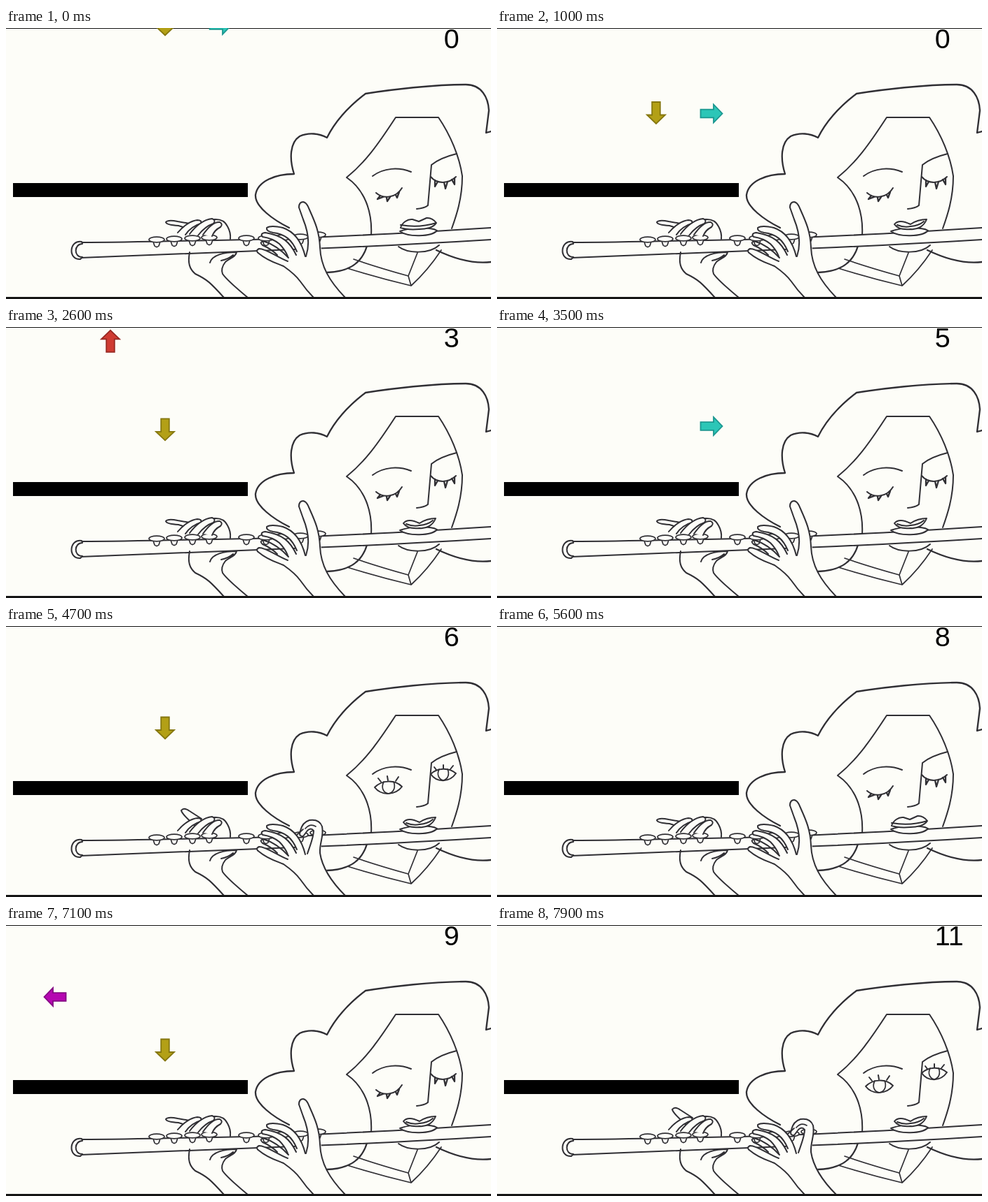
These frames come from a looping animation (692 by 388 pixels, 8 s). An HTML page:

```html
<!DOCTYPE html>
<html lang="en">
<head>
<meta charset="utf-8">
<title>Flute rhythm game</title>
<style>
  html, body { margin: 0; width: 100%; height: 100%; overflow: hidden; background: #fdfdf8; }
  svg { display: block; width: 100vw; height: 100vh; }
  .ink { fill: none; stroke: #302f34; stroke-width: 2; stroke-linecap: round; stroke-linejoin: round; }
  .skin { fill: #fdfdf8; }
  .hair { stroke-width: 2.3; }
  .lash { stroke-width: 2.3; }
  .fine { stroke-width: 1.7; }
  text { font: 39.5px "Liberation Sans", Arial, sans-serif; fill: #000; }
</style>
</head>
<body>
<svg viewBox="0 0 692 388" preserveAspectRatio="none">
  <rect width="692" height="388" fill="#fdfdf8"/>

  <g class="ink">
    <g class="hair">
      <path d="M404 286C382 275 355 256 356 239C359 219 385 209 411 209C404 187 405 164 419 155C432 149 447 151 458 157C469 135 488 113 513 94C550 88 610 81 656 81C679 81 688 100 689 118L685 150L692 148"/>
      <path d="M458 350C485 349 507 340 515 312M614 318C643 332 668 338 692 335"/>
    </g>
    <path d="M486 214C512 193 530 168 556 128H617C634 153 647 184 651 212C651 245 642 270 636 287M486 214C511 231 523 262 521 297"/>
    <path d="M643 180Q619 186 607 196L602 254Q597 258 586 259"/>
    <path d="M523 212C539 200 560 199 578 206"/>
    <path d="M560 313C573 323 604 324 618 311"/>
    <path class="fine" d="M496 331Q531 343 574 355L587 322M487 344Q532 358 578 369Q602 347 621 318M574 355L578 369"/>
  </g>

  <g class="ink">
    <path class="skin" d="M106 307C190 307 270 304 350 303Q490 299 692 286V303Q560 311 460 315Q300 321 106 329Z" stroke="none"/>
    <path d="M106 307C190 307 270 304 350 303Q490 299 692 286M106 329Q300 321 460 315Q560 311 692 303"/>
    <path class="skin" d="M108 306C90 303 88 332 106 331L109 328C96 328 97 309 109 309Z"/>
    <g id="keys" class="fine"></g>
  </g>

  <g class="ink" id="eyesShut">
    <path d="M528 236C538 245 556 244 565 229M606 213C615 224 632 223 642 213"/>
    <path class="lash" d="M534 240L530 245L538 242M543 243L544 248L548 242M556 239L558 243L561 235M612 218L612 227L616 220M625 221L627 230L630 220M636 217L640 224L640 215"/>
  </g>

  <g class="ink" id="eyesOpen">
    <path d="M526 231C537 220 555 220 565 230C556 242 536 244 526 231ZM606 212C615 203 632 202 642 211C633 224 615 225 606 212Z"/>
    <path class="fine" d="M539 223C535 231 538 239 546 240C554 238 556 230 553 223M618 205C614 213 618 220 624 221C631 219 633 212 630 205"/>
    <path d="M535 223L531 218M545 221L544 215M556 222L560 216M614 206L611 202M624 204L624 199M634 205L638 200"/>
  </g>

  <g class="ink">
    <path class="skin" d="M562 291C578 285 606 285 615 290C607 299 574 300 562 291Z"/>
    <path id="lipsWide" class="skin" d="M563 286C565 279 573 273 580 274L589 277L600 272Q608 271 614 279C610 286 598 288 590 288C578 289 569 288 563 286ZM563 282C580 285 598 284 614 279"/>
    <path id="lipsHeart" class="skin" d="M567 281C571 276 578 275 590 281C596 277 604 274 613 274C609 284 600 289 590 288C579 289 571 287 567 281ZM571 282Q581 286 590 284Q602 283 609 277"/>
  </g>

  <g class="ink">
    <path d="M262 321C259 337 262 345 270 352C287 360 292 365 311 386M291 336C294 325 311 321 329 321C328 328 318 330 313 335Q306 344 309 352Q315 361 345 386M307 333Q317 331 324 325"/>
    <path d="M297 274Q311 273 316 284Q321 293 320 302"/>
  </g>

  <g class="ink" id="handsUp">
    <path class="skin" d="M256 286L246 283Q229 282 228 278Q231 274 245 277L262 280"/>
  </g>
  <g class="ink" id="handsDown">
    <path class="skin" d="M269 286C263 279 251 270 250 264Q254 259 262 265L279 276"/>
  </g>
  <g class="ink">
    <path class="skin" d="M245 293C253 283 264 276 273 275Q280 275 278 280C270 282 261 288 256 296"/>
    <path class="skin" d="M262 295C270 284 282 274 294 273Q300 275 296 280C287 283 280 289 274 297"/>
    <path class="skin" d="M281 296C288 286 297 277 305 278Q310 281 306 285C300 288 296 293 294 298"/>
  </g>

  <g class="ink">
    <path class="skin" stroke="none" d="M402 328L412 318L432 310L449 312L456 348L484 386H438L400 345Z"/>
    <path class="skin" d="M427 327C422 307 413 292 395 286Q378 282 372 286Q371 291 381 293C398 295 408 303 415 320"/>
    <path class="skin" d="M414 325C405 306 394 297 370 293Q362 294 366 299Q380 301 390 309Q398 317 402 327"/>
    <path d="M403 329C393 318 380 309 367 305Q361 307 366 311Q378 316 387 325"/>
    <path class="skin" d="M402 334C388 329 372 316 361 316Q355 319 361 323C374 334 387 337 396 341Q413 353 420 363Q429 376 439 386"/>
  </g>

  <g class="ink" id="indexUp">
    <path class="skin" d="M428 327C434 309 431 291 424 274L418 257Q418 249 424 249Q429 250 432 258C440 276 447 290 448 314C449 341 461 362 484 386"/>
  </g>
  <g class="ink" id="indexDown">
    <path class="skin" d="M430 326C435 311 439 302 439 293Q435 288 430 293L424 301Q417 302 420 293Q423 281 433 278Q447 276 451 287C454 301 447 310 448 325C451 345 462 364 484 386"/>
    <path class="fine" d="M427 290Q434 282 442 287M415 299L424 291"/>
  </g>

  <rect width="692" height="1" fill="#111"/>
  <rect y="385" width="692" height="3" fill="#151515"/>
  <rect x="10" y="222" width="335" height="20"/>
  <g id="arrows"></g>
  <text id="score" x="624.7" y="29">0</text>
</svg>

<script>
const LOOP = 8000, STEP = 100, SPEED = 0.253;
const NS = "http://www.w3.org/2000/svg";
const $ = id => document.getElementById(id);

function add(parent, name, attrs) {
  const el = document.createElementNS(NS, name);
  for (const k in attrs) el.setAttribute(k, attrs[k]);
  return parent.appendChild(el);
}

const lanes = {
  left:  { x: 70,  turn: 180, fill: "#b507b1", edge: "#850983" },
  up:    { x: 149, turn: 270, fill: "#cf3b32", edge: "#982a24" },
  down:  { x: 227, turn: 90,  fill: "#b3a016", edge: "#85770f" },
  right: { x: 306, turn: 0,   fill: "#2cc6b7", edge: "#1b9790" }
};

// lane, time, height at that time, time of leaving
const notes = [
  ["down", 500, -5, 1500], ["right", 500, -4, 1500],
  ["right", 1700, 119, 2200], ["left", 1700, 18, 2600],
  ["down", 2000, -5, 3000], ["up", 2500, -5, 3400],
  ["right", 3500, 142, 3900], ["down", 4700, 146, 5100],
  ["left", 4800, 5, 5600], ["up", 5900, -5, 6900],
  ["down", 7100, 179, 7300], ["left", 7100, 103, 7600]
].map(([lane, at, y, end]) => {
  const { x, turn, fill, edge } = lanes[lane];
  const el = add($("arrows"), "path", {
    d: "M-15.5-5.8H3V-13L15.5 0L3 13V5.8H-15.5Z", fill, stroke: edge, "stroke-width": 1.8
  });
  return { el, x, turn, at, y, end };
});

const hits = [1500, 2200, 2600, 3000, 3400, 3900, 5100, 5600, 6900, 7300, 7600];

// rest: wide lips; play: heart lips; look: open eyes and curled fingers
const poses = [
  [0, "rest"], [1000, "play"], [2700, "look"], [3300, "play"], [3800, "look"],
  [5300, "rest"], [6300, "play"], [7800, "look"]
];

for (const [x, y] of [[215, 303], [240, 302], [266, 301], [290, 300], [343, 301], [371, 301], [395, 300], [420, 299], [445, 296]]) {
  add($("keys"), "path", { class: "skin", d: `M${x - 5} ${y + 3}L${x - 3} ${y + 9}Q${x} ${y + 12} ${x + 3} ${y + 9}L${x + 5} ${y + 3}` });
  add($("keys"), "ellipse", { class: "skin", cx: x, cy: y, rx: 11, ry: 3.8 });
}

function show(id, on) {
  $(id).style.display = on ? "" : "none";
}

function draw(ms) {
  const t = Math.floor(ms / STEP) * STEP;
  const fall = Math.max(t, 500);
  for (const n of notes) {
    const y = n.y + (fall - n.at) * SPEED;
    n.el.setAttribute("transform", `translate(${n.x} ${y}) rotate(${n.turn})`);
    n.el.style.display = t < n.end && y > -18 ? "" : "none";
  }
  $("score").textContent = hits.filter(h => h <= t).length;

  const pose = poses.filter(p => p[0] <= t).pop()[1];
  const look = pose === "look", rest = pose === "rest";
  show("eyesOpen", look);
  show("eyesShut", !look);
  show("handsDown", look);
  show("handsUp", !look);
  show("indexDown", look);
  show("indexUp", !look);
  show("lipsWide", rest);
  show("lipsHeart", !rest);
}

const start = performance.now();
function tick() {
  draw((performance.now() - start) % LOOP);
  requestAnimationFrame(tick);
}
tick();
</script>
</body>
</html>
```
